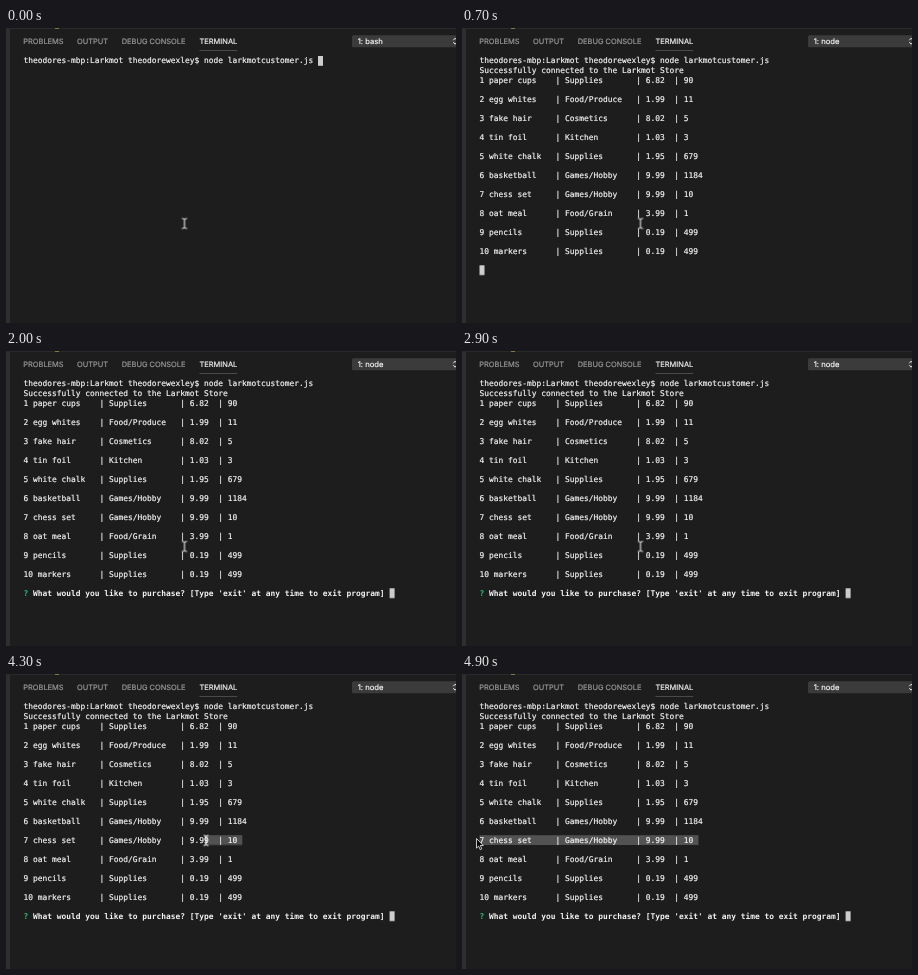
Animation, 450 px wide and 295 px high, one loop 5 s. Source, as an HTML page:

```html
<!DOCTYPE html>
<html lang="en">
<head>
<meta charset="utf-8">
<title>Terminal session</title>
<style>
  html, body { margin: 0; width: 100%; height: 100%; overflow: hidden; background: #1d1d1e; }
  svg { display: block; width: 450px; height: 295px; }
  text { white-space: pre; text-rendering: geometricPrecision; stroke-width: .2px; }
  .tab { font: 7.45px Inter, sans-serif; fill: #979798; stroke: #979798; }
  .active { fill: #f0f0f0; stroke: #f0f0f0; }
  .picker { font: 7.7px Inter, sans-serif; fill: #f4f4f4; stroke: #f4f4f4; }
  .line { font: 7.907px "DejaVu Sans Mono", monospace; fill: #f4f4f4; stroke: #f4f4f4; }
  .bold { font-weight: bold; stroke: none; }
  .mark { fill: #23c878; }

  .bash, .node, .table, .prompt, .arrow, .block, .beam, .selection {
    animation: 5s step-end infinite;
  }
  .bash { animation-name: bash; }
  .node { animation-name: node; }
  .table { animation-name: table; }
  .prompt { animation-name: prompt; }
  .arrow { animation-name: arrow; }
  .block { animation-name: block; }
  .beam { animation-name: beam; }
  .selection { animation-name: selection; transform-origin: 236.46px 0; }

  @keyframes bash { 0% { visibility: visible } 8%, 100% { visibility: hidden } }
  @keyframes node { 0% { visibility: hidden } 8%, 100% { visibility: visible } }
  @keyframes table { 0% { visibility: hidden } 14%, 100% { visibility: visible } }
  @keyframes prompt { 0% { visibility: hidden } 16%, 100% { visibility: visible } }
  @keyframes arrow { 0% { visibility: hidden } 98%, 100% { visibility: visible } }

  @keyframes block {
    0% { transform: translate(312px, 28px) }
    8% { transform: translate(17.5px, 37.5px) }
    14% { transform: translate(17.5px, 237.3px) }
    16%, 100% { transform: translate(383.6px, 237.3px) }
  }

  @keyframes beam {
    0% { transform: translate(178.5px, 195.5px); visibility: visible }
    66% { transform: translate(184px, 193px) }
    68% { transform: translate(196px, 187px) }
    70% { transform: translate(212px, 180px) }
    72% { transform: translate(225px, 175px) }
    74% { transform: translate(233px, 173px) }
    76% { transform: translate(235.5px, 173px) }
    78% { transform: translate(235.5px, 171px) }
    80% { transform: translate(235.5px, 168px) }
    82% { transform: translate(235.5px, 166.5px) }
    86% { transform: translate(200px, 166.5px) }
    88% { transform: translate(128px, 166.5px) }
    90% { transform: translate(62.5px, 166.5px) }
    92% { transform: translate(39px, 166.5px) }
    94% { transform: translate(26px, 166.5px) }
    96% { transform: translate(19px, 166.5px); visibility: visible }
    98%, 100% { transform: translate(15px, 166.5px); visibility: hidden }
  }

  @keyframes selection {
    0% { transform: scaleX(0) }
    86% { transform: scaleX(calc(8 / 46)) }
    88% { transform: scaleX(calc(23 / 46)) }
    90% { transform: scaleX(calc(37 / 46)) }
    92% { transform: scaleX(calc(42 / 46)) }
    94% { transform: scaleX(calc(45 / 46)) }
    96%, 100% { transform: scaleX(1) }
  }
</style>
</head>
<body>
<svg viewBox="0 0 450 295">
  <rect width="450" height="295" fill="#1d1d1e"/>
  <rect width="4" height="295" fill="#2e2e2f"/>
  <rect width="450" height="1" fill="#29292a"/>
  <rect x="49" width="4" height="1" fill="#85783a"/>

  <text class="tab" x="17.3" y="16">PROBLEMS</text>
  <text class="tab" x="71" y="16">OUTPUT</text>
  <text class="tab" x="115.7" y="16">DEBUG CONSOLE</text>
  <text class="tab active" x="193.5" y="16">TERMINAL</text>
  <rect x="193.5" y="22" width="37.5" height="1" fill="#4a4a4b"/>

  <rect x="346" y="7.2" width="108" height="12" rx="1.5" fill="#3b3b3c"/>
  <text class="picker bash" x="351.7" y="16">1: bash</text>
  <text class="picker node" x="351.7" y="16">1: node</text>
  <path d="M447.3 12.2l1.8-2 1.8 2M447.3 14.2l1.8 2 1.8-2" fill="none" stroke="#eee" stroke-width="1"/>

  <rect class="selection" x="17.5" y="161.2" width="218.96" height="9.8" fill="#525253"/>
  <g id="intro"></g>
  <g id="table" class="table"></g>
  <g id="prompt" class="prompt"></g>
  <rect class="block" width="5" height="9.8" fill="#cdcdcd"/>

  <path class="beam" d="M-2.5-5Q0-5 0-3.8Q0-5 2.5-5M0-3.8V3.8M-2.5 5Q0 5 0 3.8Q0 5 2.5 5"
    fill="none" stroke="#fff" stroke-width="1"/>
  <path class="arrow" d="M14.5 164.5v9.6l2.2-2 1.5 3.5 1.6-.7-1.5-3.4h3z"
    fill="#050505" stroke="#f4f4f4" stroke-width=".8" stroke-linejoin="round"/>
</svg>
<script>
  const LEFT = 17.5, BASELINE = 35.45, LINE = 9.54, CHAR = 4.76;

  function print(id, row, text, col = 0, style = "") {
    const line = document.createElementNS("http://www.w3.org/2000/svg", "text");
    line.setAttribute("class", `line ${style}`);
    line.setAttribute("x", LEFT + col * CHAR);
    line.setAttribute("y", BASELINE + row * LINE);
    line.textContent = text;
    document.getElementById(id).append(line);
  }

  const stock = [
    ["paper cups", "Supplies", "6.82", 90],
    ["egg whites", "Food/Produce", "1.99", 11],
    ["fake hair", "Cosmetics", "8.02", 5],
    ["tin foil", "Kitchen", "1.03", 3],
    ["white chalk", "Supplies", "1.95", 679],
    ["basketball", "Games/Hobby", "9.99", 1184],
    ["chess set", "Games/Hobby", "9.99", 10],
    ["oat meal", "Food/Grain", "3.99", 1],
    ["pencils", "Supplies", "0.19", 499],
    ["markers", "Supplies", "0.19", 499],
  ];

  print("intro", 0, "theodores-mbp:Larkmot theodorewexley$ node larkmotcustomer.js");
  print("table", 1, "Successfully connected to the Larkmot Store");
  stock.forEach(([item, department, price, count], i) => {
    const name = `${i + 1} ${item}`.padEnd(16);
    print("table", 2 + 2 * i, `${name}| ${department.padEnd(15)}| ${price.padEnd(6)}| ${count}`);
  });
  print("prompt", 22, "?", 0, "bold mark");
  print("prompt", 22, "What would you like to purchase? [Type 'exit' at any time to exit program]", 2, "bold");
</script>
</body>
</html>
```
